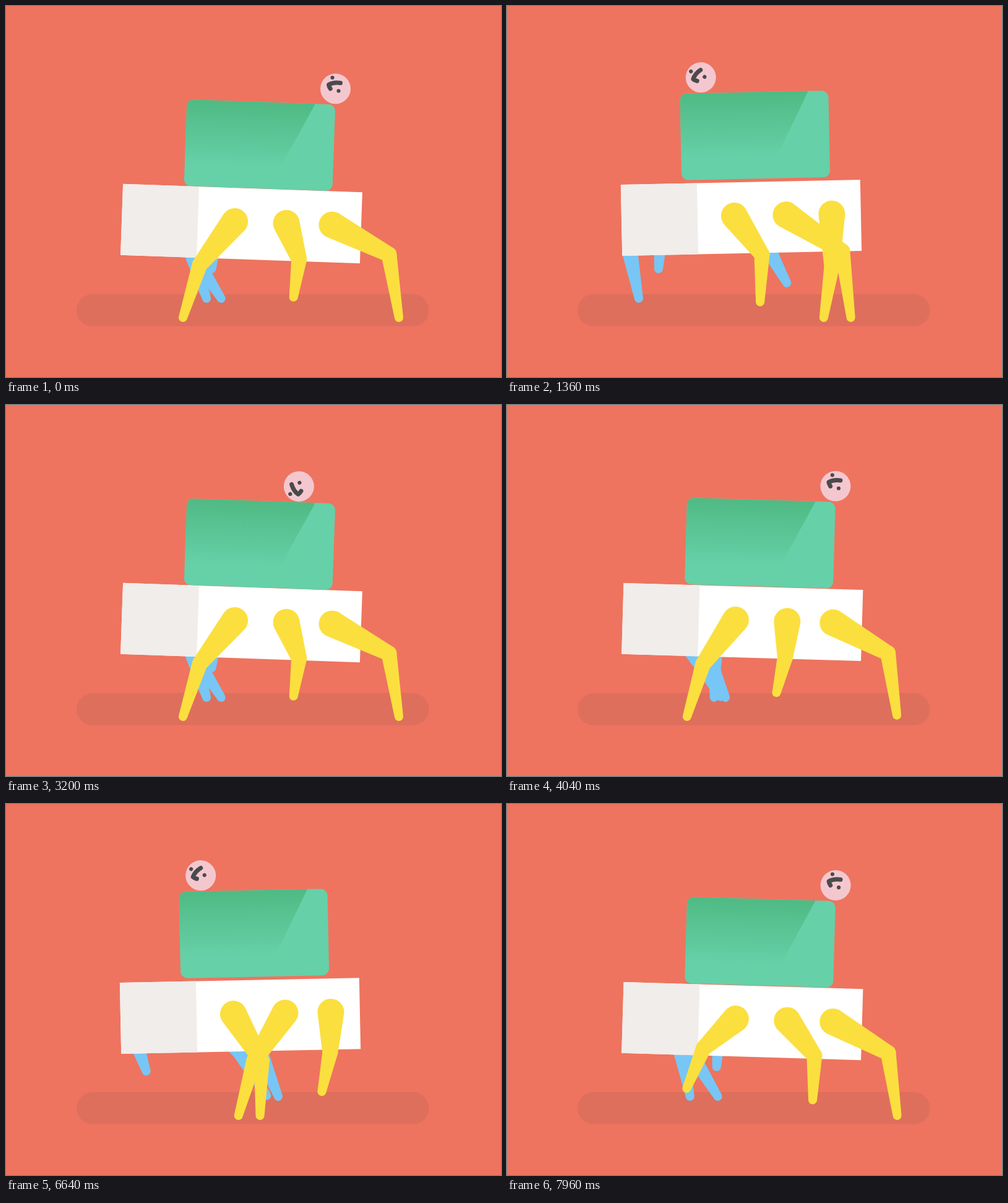
Recreate the animation shown at these times as an HTML page with a canvas. Size 800 px wide and 600 px high, loop 8 s.

```html
<!DOCTYPE html>
<html lang="en">
<head>
<meta charset="utf-8">
<title>Walking table</title>
<style>
html, body { margin: 0; height: 100%; overflow: hidden; background: #ee745f; }
canvas { display: block; width: 100vw; height: 100vh; }
</style>
</head>
<body>
<canvas width="800" height="600"></canvas>
<script>
const ctx = document.querySelector('canvas').getContext('2d');
const TAU = Math.PI * 2;
const STEP = 800, ROLL = 4000;

// hip: x in body space; center, reach: foot sweep; phase: start of stance in cycles
const near = {
  color: '#fbdf3f', hipY: -3.2, ground: 504, lift: 44, bend: 11, bendRate: .33,
  legs: [
    { hip: -11, center: 380.6, reach: 94.6, phase: 0 },
    { hip: 72.5, center: 465.5, reach: 94.6, phase: .25 },
    { hip: 146.5, center: 540.4, reach: 94.6, phase: .5 }
  ]
};
const far = {
  color: '#77c6f5', hipY: -10, ground: 473, lift: 48, bend: -20, bendRate: .27,
  legs: [
    { hip: 27, center: 419.3, reach: 87, phase: .013 },
    { hip: -61, center: 331, reach: 93, phase: .763 },
    { hip: -141, center: 250, reach: 98, phase: .513 }
  ]
};

const cubicInOut = u => u < .5 ? 4 * u ** 3 : 1 - 4 * (1 - u) ** 3;

function box(x, y, w, h, r, color) {
  ctx.fillStyle = color;
  ctx.beginPath();
  ctx.roundRect(x, y, w, h, r);
  ctx.fill();
}

function dot(x, y, r, color) {
  ctx.fillStyle = color;
  ctx.beginPath();
  ctx.arc(x, y, r, 0, TAU);
  ctx.fill();
}

function taper(x1, y1, r1, x2, y2, r2) {
  const dx = x2 - x1, dy = y2 - y1;
  const a = Math.atan2(dy, dx), b = Math.acos((r1 - r2) / Math.hypot(dx, dy));
  ctx.beginPath();
  ctx.arc(x1, y1, r1, a + b, a - b + TAU);
  ctx.arc(x2, y2, r2, a - b, a + b);
  ctx.fill();
}

function drawLegs(set, t, body) {
  ctx.fillStyle = set.color;
  const cos = Math.cos(body.angle), sin = Math.sin(body.angle);
  for (const leg of set.legs) {
    const hx = body.x + leg.hip * cos - set.hipY * sin;
    const hy = body.y + leg.hip * sin + set.hipY * cos;
    const cycle = (t / STEP - leg.phase + 1) % 1;
    const swing = cycle > .5 ? 1 - Math.cos(TAU * (cycle - .5) / 2) ** 4 : 0;
    const fx = leg.center - leg.reach * Math.cos(TAU * cycle);
    const fy = set.ground - set.lift * swing;
    const dx = fx - hx, dy = fy - hy;
    const bend = (set.bend + set.bendRate * dx) / Math.hypot(dx, dy);
    const kx = (hx + fx) / 2 + dy * bend, ky = (hy + fy) / 2 - dx * bend;
    taper(hx, hy, 21.5, kx, ky, 12.5);
    taper(kx, ky, 12.5, fx, fy, 7);
  }
}

function drawBlock(y) {
  ctx.save();
  ctx.translate(25, y);
  box(-120, -70, 240, 140, 11, '#66d0a8');
  ctx.clip();
  const shade = ctx.createLinearGradient(0, -70, 0, 36);
  shade.addColorStop(0, '#50ba84');
  shade.addColorStop(1, '#66d0a8');
  ctx.fillStyle = shade;
  ctx.beginPath();
  ctx.moveTo(-120, -70);
  ctx.lineTo(87.6, -70);
  ctx.lineTo(33.8, 36);
  ctx.lineTo(-120, 36);
  ctx.fill();
  ctx.restore();
}

function drawBall(t, y) {
  const u = (t + 3.5) % ROLL / (ROLL / 2);
  const p = cubicInOut(u < 1 ? u : 2 - u);
  ctx.save();
  ctx.translate(144.3 - 235 * p, y);
  ctx.rotate(-(2 + 459 * p) * TAU / 360);
  dot(0, 0, 24.5, '#f4c7cf');
  dot(-5, -18, 3.1, '#4a4a4c');
  dot(5, 3.5, 3.1, '#4a4a4c');
  ctx.strokeStyle = '#4a4a4c';
  ctx.lineWidth = 7;
  ctx.lineCap = ctx.lineJoin = 'round';
  ctx.beginPath();
  ctx.moveTo(8, -9.2);
  ctx.quadraticCurveTo(-3, -11, -11, -6.5);
  ctx.quadraticCurveTo(-10.5, -3, -8.3, 0);
  ctx.stroke();
  ctx.restore();
}

function draw(t) {
  const rise = (1 - Math.cos(TAU * t / (STEP / 2))) / 2;
  const body = {
    x: 380.5 - 2.2 * rise,
    y: 352 - 10.5 * rise,
    angle: (2 - 3.5 * rise) * TAU / 360
  };
  const blockY = -127.8 - 5.3 * rise;

  box(0, 0, 800, 600, 0, '#ee745f');
  box(114, 466, 569.5, 52, 26, '#de6f5c');
  drawLegs(far, t, body);

  ctx.save();
  ctx.translate(body.x, body.y);
  ctx.rotate(body.angle);
  box(-193.5, -57.5, 387, 115, 0, '#fff');
  box(-193.5, -57.5, 123, 115, 0, '#f1edea');
  drawBlock(blockY);
  drawBall(t, blockY - 95.6);
  ctx.restore();

  drawLegs(near, t, body);
}

const start = performance.now();
function frame() {
  draw((performance.now() - start) % ROLL);
  requestAnimationFrame(frame);
}
frame();
</script>
</body>
</html>
```
